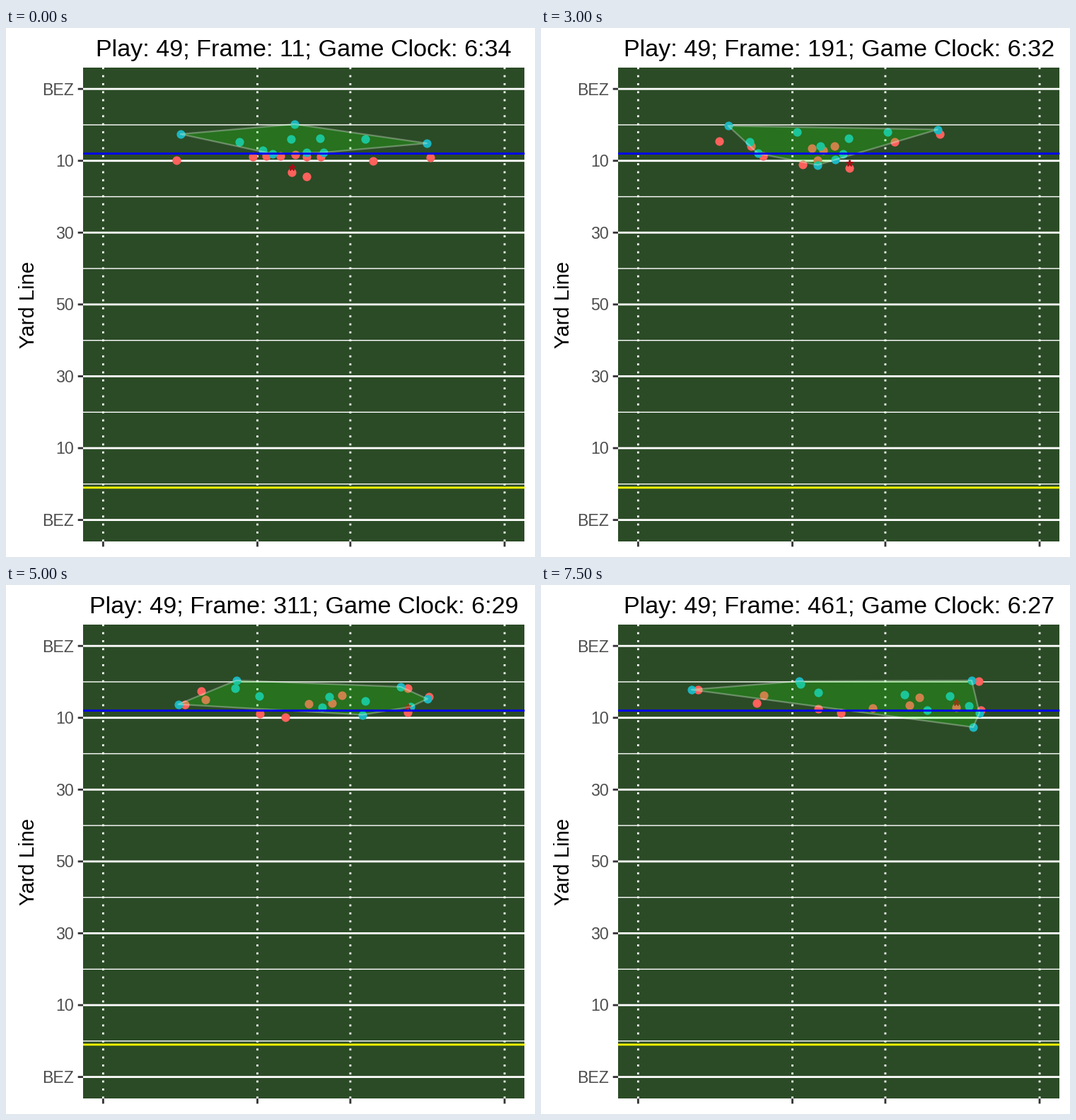
Animation of 748 by 748 pixels, one loop 8000 ms. Source, as a matplotlib script:

```python
import numpy as np
import matplotlib.pyplot as plt
from matplotlib.animation import FuncAnimation
from matplotlib.patches import Polygon, Rectangle

SIZE, DPI = 748, 100
PX = 72 / DPI                        # one pixel in points
FRAMES, INTERVAL = 16, 500
SNAP, LAST = 2, FRAMES - 1           # players stand still until the snap
LEFT, RIGHT, TOP, BOTTOM = 109, 733.4, 55.7, 726.1
MARGIN = 1 / 22                      # empty share on each side of the field
FIELD, OFFENSE, DEFENSE = "#2b4b26", "#fc615c", "#1cb6bf"
BEATS = {3: (SNAP, 7, LAST), 4: (SNAP, 7, 11, LAST), 6: (SNAP, 4, 7, 9, 12, LAST)}

plt.rcParams["font.family"] = "Liberation Sans"

offense, defense = [], []


def route(team, *points):
    """Smooth run through key points on shared beats, starting from rest."""
    beats = np.array(BEATS[len(points)])
    points = np.array(points, float)
    slopes = np.gradient(points, beats, axis=0)
    slopes[0] = 0

    def position(step):
        step = max(step, SNAP)
        k = min(np.searchsorted(beats, step, side="right"), len(beats) - 1) - 1
        span = beats[k + 1] - beats[k]
        u = (step - beats[k]) / span
        ease = u * u * (3 - 2 * u)
        return (points[k] * (1 - ease) + points[k + 1] * ease
                + span * u * (1 - u) * (slopes[k] * (1 - u) - slopes[k + 1] * u))

    team.append(position)
    return position


def shadow(team, leader, start, end):
    """Follow a leader while the gap closes from start to end."""
    start, end = np.array(start), np.array(end)

    def position(step):
        gap = np.exp(-(max(step - SNAP, 0) / 4.5) ** 2)
        return leader(step) + end + (start - end) * gap

    team.append(position)


# Receivers, each with a defender closing in
route(offense, (241, 187), (257, 154), (315, 156))
tight_end = route(offense, (519, 188), (505, 155), (587, 144), (619, 136))
shadow(defense, tight_end, (-11, -31), (-10, -1))
receiver = route(offense, (600, 183), (562, 146), (609, 163), (622, 177))
shadow(defense, receiver, (-5, -20), (-2, 4))

# Backfield, with the safety mirroring the running back
carrier = route(offense, (404, 204), (399, 203), (466, 194),
                (545, 183), (590, 177), (587, 173))
back = route(offense, (425, 210), (359, 189), (392, 175))
shadow(defense, back, (-17, -74), (0, -23))

# Offensive line
route(offense, (349, 182), (286, 164), (305, 167))
route(offense, (388, 181), (388, 168), (441, 169), (469, 174))
route(offense, (409, 179), (388, 188), (424, 181))
guard = route(offense, (425, 182), (402, 171), (480, 166), (521, 170))
shadow(offense, guard, (20, 0), (14, -11))

# Defenders drifting to the left side
route(defense, (247, 150), (275, 136), (340, 135), (365, 136))
route(defense, (330, 161), (293, 159), (335, 142), (367, 140))
end_rusher = route(defense, (363, 173), (290, 177), (232, 165), (213, 148))
shadow(offense, end_rusher, (5, 8), (9, 0))

# Defenders chasing the ball
route(defense, (403, 157), (402, 168), (480, 155), (578, 157))
route(defense, (444, 156), (449, 158), (603, 178), (611, 201))
route(defense, (377, 178), (407, 195), (529, 180), (546, 177))
route(defense, (425, 176), (419, 186), (459, 168), (514, 155))
route(defense, (449, 176), (433, 177), (534, 162), (605, 171))


def convex_hull(points):
    ordered = sorted(map(tuple, points))

    def half(sequence):
        chain = []
        for p in sequence:
            while len(chain) > 1:
                (x0, y0), (x1, y1) = chain[-2:]
                if (x1 - x0) * (p[1] - y0) > (y1 - y0) * (p[0] - x0):
                    break
                chain.pop()
            chain.append(p)
        return chain[:-1]

    return half(ordered) + half(ordered[::-1])


fig = plt.figure(figsize=(SIZE / DPI, SIZE / DPI), dpi=DPI, facecolor="white")
ax = fig.add_axes([0, 0, 1, 1])
ax.set(xlim=(0, SIZE), ylim=(SIZE, 0))
ax.axis("off")


def line(x0, y0, x1, y1, color, width, z, **style):
    ax.plot([x0, x1], [y0, y1], color=color, lw=width * PX, zorder=z, snap=False,
            solid_capstyle="butt", dash_capstyle="butt", **style)


def label(x, y, text, size, **style):
    return ax.text(x, y, text, fontsize=size * PX, va="baseline",
                   rotation_mode="anchor", **style)


def dots(color, z):
    return ax.plot([], [], "o", ms=12.2 * PX, color=color, mew=0, zorder=z)[0]


ax.add_patch(Rectangle((LEFT, TOP), RIGHT - LEFT, BOTTOM - TOP, fc=FIELD, lw=0, zorder=0))

field_top = TOP + MARGIN * (BOTTOM - TOP)
yard = (1 - 2 * MARGIN) * (BOTTOM - TOP) / 120

for k, name in enumerate(["BEZ", "10", "30", "50", "30", "10", "BEZ"]):
    y = field_top + 20 * yard * k
    line(LEFT, y, RIGHT, y, "white", 2.83, 2)
    if k < 6:
        line(LEFT, y + 10 * yard, RIGHT, y + 10 * yard, "white", 1.42, 1)
    line(LEFT - 7.3, y, LEFT, y, "#333333", 2.83, 1)
    label(96.3, y + 8.4, name, 23.1, ha="right", color="#4d4d4d")

middle = (LEFT + RIGHT) / 2
sideline = (0.5 - MARGIN) * (RIGHT - LEFT)
for offset in (-sideline, -65.7, 65.7, sideline):
    x = middle + offset
    line(x, BOTTOM, x, TOP, "white", 2.83, 2, linestyle=(0, (1, 3)))
    line(x, BOTTOM, x, BOTTOM + 7.3, "#333333", 2.83, 1)

for yards, color in ((18, "blue"), (111, "yellow")):
    y = field_top + yards * yard
    line(LEFT, y, RIGHT, y, color, 2.83, 7)

label(40.5, 391.5, "Yard Line", 29.3, rotation=90, ha="center", color="black")
title = label(middle, 39.5, "", 34.2, ha="center", color="black")

offense_dots = dots(OFFENSE, 3)
defense_dots = dots(DEFENSE, 4)
ball, = ax.plot([], [], marker=(5, 2, 0), ms=9.5 * PX, mew=2.2 * PX,
                color="#a30f14", zorder=5)
hull = Polygon([(0, 0), (1, 0), (0, 1)], fc=(0.1, 1, 0.03, 0.21), ec=(1, 1, 1, 0.3),
               lw=2.3 * PX, joinstyle="round", zorder=6)
ax.add_patch(hull)


def update(step):
    attackers = np.array([path(step) for path in offense])
    defenders = np.array([path(step) for path in defense])
    offense_dots.set_data(*attackers.T)
    defense_dots.set_data(*defenders.T)
    hull.set_xy(convex_hull(defenders))
    x, y = carrier(step)
    ball.set_data([x], [y - 7.5])
    # The clock holds one step longer at 6:32.
    seconds = 34 - step // 2 + (step == 6)
    title.set_text(f"Play: 49; Frame: {11 + 30 * step}; Game Clock: 6:{seconds}")
    return offense_dots, defense_dots, ball, hull, title


anim = FuncAnimation(fig, update, frames=FRAMES, interval=INTERVAL,
                     repeat=True, repeat_delay=0)
plt.show()
```
